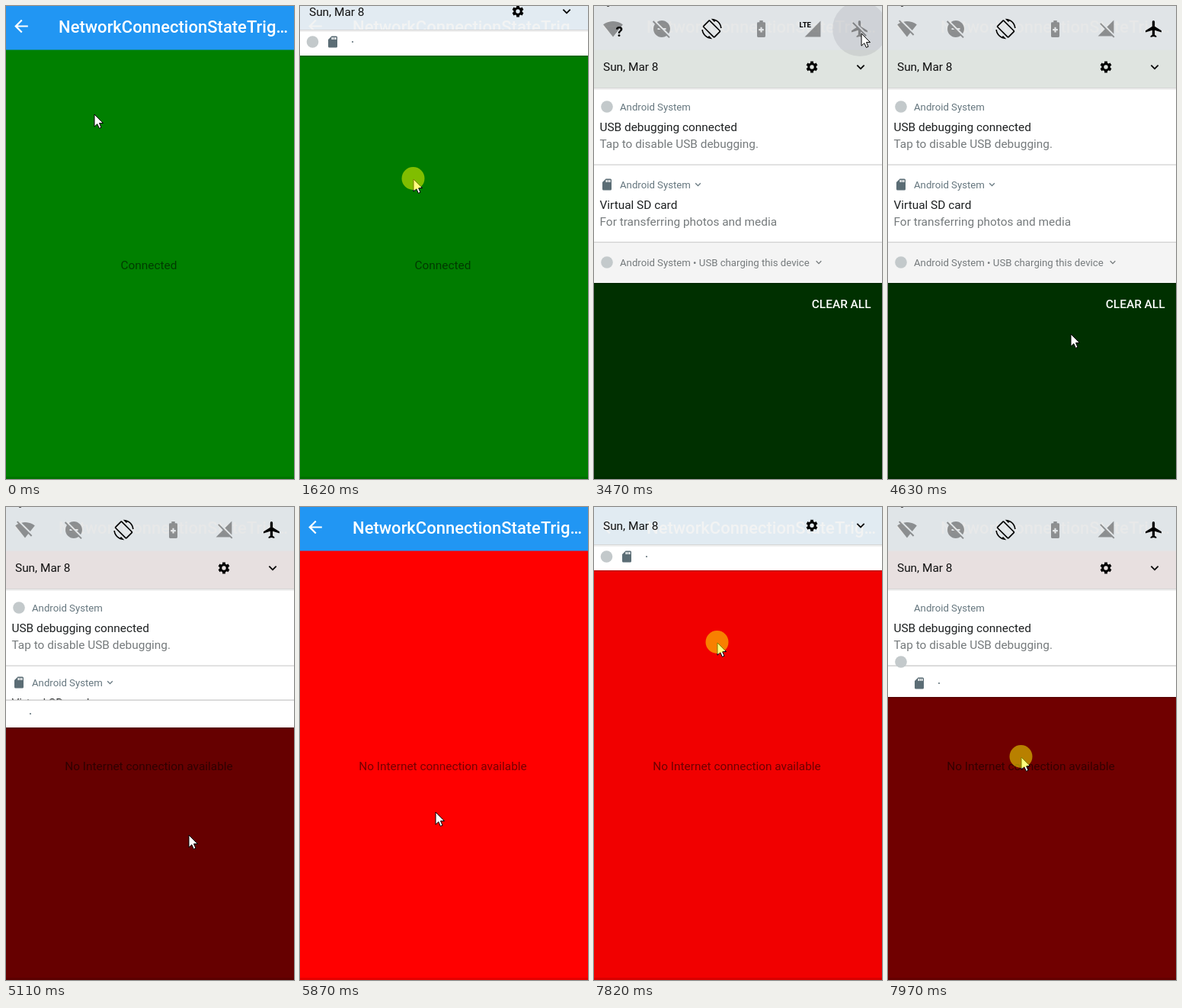
Write an HTML page with a canvas that moves like this. It is 378 px wide and 620 px high and loops after 8 s.

```html
<!DOCTYPE html>
<html lang="en">
<head>
<meta charset="utf-8">
<title>Network state trigger</title>
<style>
html, body { margin: 0; width: 100%; height: 100%; overflow: hidden; background: #008000; }
canvas { display: block; width: 378px; height: 620px; }
</style>
</head>
<body>
<canvas id="stage" width="378" height="620"></canvas>
<script>
const ctx = document.getElementById('stage').getContext('2d');
const W = 378, LOOP = 8000, STEP = 77.3;
const GREY = 'rgba(0,0,0,.38)', SLATE = '#66777f', DARK = '#1c1f20', SOFT = '#757a7c';

// Icons on a 24 unit grid
const ICONS = {
  back: 'M20 11H7.83l5.59-5.59L12 4l-8 8 8 8 1.41-1.41L7.83 13H20z',
  chevron: 'M16.59 8.59L12 13.17 7.41 8.59 6 10l6 6 6-6z',
  wifi: 'M12 21.5L23.64 7C23.2 6.66 18.7 3 12 3S.81 6.66.36 7z',
  wifiOff: 'M23.64 7c-.45-.34-4.93-4-11.64-4-1.5 0-2.89.19-4.15.48L18.18 13.8zM17.04 15.22L3.27 1.44 2 2.72l2.05 2.06C1.91 5.76.59 6.82.36 7L12 21.5l3.91-4.87 3.32 3.32 1.27-1.27z',
  quietOff: 'M17 11v2h-1.46l4.68 4.68A9.92 9.92 0 0 0 22 12c0-5.52-4.48-10-10-10-2.11 0-4.07.66-5.68 1.78L13.54 11zM2.27 2.27L1 3.54l2.78 2.78A9.92 9.92 0 0 0 2 12c0 5.52 4.48 10 10 10 2.11 0 4.07-.66 5.68-1.78L20.46 23l1.27-1.27zM7 13v-2h1.46l2 2z',
  rotate: 'M16.48 2.52c3.27 1.55 5.61 4.72 5.97 8.48h1.5C23.44 4.84 18.29 0 12 0l-.66.03 3.81 3.81zM10.23 1.75c-.59-.59-1.54-.59-2.12 0L1.75 8.11c-.59.59-.59 1.54 0 2.12l12.02 12.02c.59.59 1.54.59 2.12 0l6.36-6.36c.59-.59.59-1.54 0-2.12zM14.83 21.19L2.81 9.17l6.36-6.36 12.02 12.02zM7.52 21.48C4.25 19.94 1.91 16.76 1.55 13H.05C.56 19.16 5.71 24 12 24l.66-.03-3.81-3.81z',
  battery: 'M14 4V2h-4v2H8.3Q7 4 7 5.3V20.7Q7 22 8.3 22h7.4Q17 22 17 20.7V5.3Q17 4 15.7 4zM9 12h2v-2h2v2h2v2h-2v2h-2v-2H9z',
  signal: 'M2 22h20V2z',
  signalOff: 'M21 1l-8.59 8.59L21 18.18zM4.77 4.5L3.5 5.77l6.36 6.36L1 21h17.73l2 2L22 21.73z',
  plane: 'M21 16v-2l-8-5V3.5a1.5 1.5 0 0 0-3 0V9l-8 5v2l8-2.5V19l-2 1.5V22l3.5-1 3.5 1v-1.5L13 19v-5.5z',
  planeOff: 'M13 9V3.5a1.5 1.5 0 0 0-3 0v3.68l7.83 7.83L21 16v-2zM3 5.27l4.99 4.99L2 14v2l8-2.5V19l-2 1.5V22l3.5-1 3.5 1v-1.5L13 19v-3.73L18.73 21 20 19.73 4.27 4z',
  card: 'M18 2h-8L4 8v12q0 2 2 2h12q2 0 2-2V4q0-2-2-2zM10 4h2v4h-2zM13 4h2v4h-2zM16 4h2v4h-2z',
};
for (const name in ICONS) ICONS[name] = new Path2D(ICONS[name]);
const ARROW = new Path2D('M0 0V16.2L3.8 12.7 6.4 18.4 9 17.2 6.5 11.6H11.5z');

// Keys are [step, ...values]; the picture is refreshed once per step
const CURSOR = [
  [0, 116, 142], [7, 80, 50], [11, 100, 4], [18, 100, 4], [19, 112, 30], [21, 149, 227],
  [23, 153, 345], [25, 153, 401], [26, 153, 401], [35, 352, 60], [37, 340, 40], [39, 351, 36],
  [52, 351, 36], [57, 212, 330], [60, 240, 430], [75, 240, 430], [76, 178, 400],
  [78, 97, 352], [82, 298, 350], [83, 298, 350], [87, 124, 328], [88, 124, 328],
  [92, 108, 1], [99, 108, 1], [100, 130, 60], [101, 162, 178], [103, 175, 328],
];
const PANEL = [
  [0, 0], [18, 0], [19, 8], [20, 38], [21, 65], [22, 190], [23, 290], [24, 345], [25, 363],
  [63, 363], [64, 355], [65, 330], [66, 289], [67, 150], [68, 0],
  [99, 0], [100, 38], [101, 83], [102, 160], [103, 249],
];
const SCRIM = [[0, 0], [65, .03], [83, .055], [249, .56], [289, .6], [363, .625]];
const PRESSES = [[19, 25], [41, 43], [62, 64], [100, 104]];

function track(keys, at) {
  const next = keys.findIndex(key => key[0] > at);
  if (next < 0) return keys[keys.length - 1].slice(1);
  const a = keys[next - 1], b = keys[next];
  const p = (at - a[0]) / (b[0] - a[0]);
  return a.slice(1).map((v, i) => v + (b[i + 1] - v) * p);
}

function rect(x, y, w, h, color) {
  ctx.fillStyle = color;
  ctx.fillRect(x, y, w, h);
}

function disc(x, y, r, color) {
  ctx.fillStyle = color;
  ctx.beginPath();
  ctx.arc(x, y, r, 0, 2 * Math.PI);
  ctx.fill();
}

function text(str, x, y, color, size = 15.4, weight = 400, align = 'left') {
  ctx.font = `${weight} ${size}px Roboto, sans-serif`;
  ctx.textAlign = align;
  ctx.fillStyle = color;
  ctx.fillText(str, x, y);
}

function icon(name, cx, cy, size, color) {
  ctx.save();
  ctx.translate(cx - size / 2, cy - size / 2);
  ctx.scale(size / 24, size / 24);
  ctx.fillStyle = color;
  ctx.fill(ICONS[name], 'evenodd');
  ctx.restore();
}

function gear(x, y) {
  ctx.strokeStyle = '#000';
  ctx.lineWidth = 3;
  ctx.beginPath();
  ctx.arc(x, y, 4.2, 0, 2 * Math.PI);
  ctx.stroke();
  ctx.lineWidth = 3.8;
  ctx.beginPath();
  for (let i = 0; i < 6; i++) {
    const a = (i + .5) * Math.PI / 3, c = Math.cos(a), s = Math.sin(a);
    ctx.moveTo(x + 4 * c, y + 4 * s);
    ctx.lineTo(x + 7.5 * c, y + 7.5 * s);
  }
  ctx.stroke();
}

const badge = (x, y) => disc(x, y, 7.8, '#c3c9cb');
const card = (x, y) => icon('card', x, y, 18, '#5b6d75');
const dot = (x, y) => disc(x, y, 1.1, SLATE);

function page(online) {
  rect(0, 0, W, 620, online ? '#008000' : '#f00');
  rect(0, 617, W, 3, 'rgba(0,0,0,.1)');
  text(online ? 'Connected' : 'No Internet connection available',
    187.5, 345, 'rgba(0,0,0,.54)', 15.4, 400, 'center');
  rect(0, 0, W, 57.5, '#2196f3');
  icon('back', 20, 26.5, 26.4, '#fff');
  text('NetworkConnectionStateTrig…', 69, 35, '#fff', 22, 500);
}

function tiles(y, step) {
  const wifiLost = step >= 47, flight = step >= 48;
  if (step >= 45 && step < 50) disc(349, y, 36, `rgba(0,0,30,${.08 * (50 - step) / 5})`);
  icon(wifiLost ? 'wifiOff' : 'wifi', 25, y, 26.4, GREY);
  if (!wifiLost) {
    ctx.lineWidth = 4;
    ctx.strokeStyle = '#dfe5e9';
    ctx.strokeText('', 0, 0);
    text('?', 28.5, y + 10, '#000', 19, 700);
  }
  icon('quietOff', 89, y, 26.4, GREY);
  icon('rotate', 154.5, y, 26.4, '#000');
  icon('battery', 219.5, y, 26.4, GREY);
  icon(flight ? 'signalOff' : 'signal', 287, y, 25, GREY);
  if (!flight) {
    rect(269, y - 12, 16, 11, '#dfe5e9');
    text('LTE', 269.5, y - 2.5, '#000', 9.5, 700);
  }
  icon(flight ? 'plane' : 'planeOff', 349, y, 26.4, flight ? '#000' : GREY);
}

function header(height, step) {
  rect(0, 0, W, height, 'rgba(242,243,244,.92)');
  ctx.save();
  ctx.beginPath();
  ctx.rect(0, 0, W, height);
  ctx.clip();
  ctx.globalAlpha = Math.max(0, Math.min(1, (height - 60) / 40));
  tiles(height - 77, step);
  rect(17, 0, 3, 1, '#555');
  ctx.globalAlpha = 1;
  const y = height - 24 - (height - 31) * .04;
  text('Sun, Mar 8', 12, y + 5.5, '#111');
  gear(286, y);
  icon('chevron', 350, y, 21, '#000');
  ctx.restore();
}

function notice(y, title, detail) {
  text('Android System', 34, y + 5, SLATE, 13.2);
  text(title, 7.5, y + 32, DARK);
  text(detail, 7.5, y + 54, SOFT);
}

function notices(top, bottom) {
  const open = bottom >= 360;
  let shelf = bottom - 36;
  if (bottom < 260) shelf = Math.min(shelf, 208);
  shelf = open ? bottom : Math.max(top, shelf);

  rect(0, top, W, bottom - top, '#fff');
  ctx.save();
  ctx.beginPath();
  ctx.rect(0, top, W, shelf - top);
  ctx.clip();
  if (bottom >= 260) badge(17, 132);
  if (bottom >= 180) notice(132, 'USB debugging connected', 'Tap to disable USB debugging.');
  if (bottom >= 260) {
    const y = open ? 234 : 230;
    rect(0, 207.5, W, 1.2, '#cfcfcf');
    card(17, y);
    notice(y, 'Virtual SD card', 'For transferring photos and media');
    icon('chevron', 136.5, y, 15, SLATE);
  }
  if (open) {
    rect(0, 309, W, 54, '#f4f4f4');
    rect(0, 309, W, 1.2, '#cfcfcf');
    badge(17, 336);
    text('Android System • USB charging this device', 34, 341, SOFT, 13.2);
    icon('chevron', 295, 336, 15, SOFT);
  }
  ctx.restore();

  if (!open) {
    if (bottom >= 180) rect(0, shelf - .5, W, 1.2, '#c4c4c4');
    const y = bottom - 18;
    if (bottom < 180) {
      badge(16.5, y);
      card(43, y);
      dot(69, y);
    } else if (bottom < 260) {
      badge(17, shelf - 5);
      card(41, y);
      dot(67, y);
    } else {
      dot(32, y);
    }
  }
  rect(0, top, W, 1, 'rgba(0,0,0,.16)');
  rect(0, top + 1, W, 2, 'rgba(0,0,0,.06)');
  rect(0, bottom, W, 1.5, 'rgba(0,0,0,.22)');
}

function panel(bottom, step) {
  rect(0, 0, W, 620, `rgba(0,0,0,${track(SCRIM, bottom)[0]})`);
  const top = Math.max(0, Math.min(107, bottom - 34));
  header(top, step);
  notices(top, bottom);
  if (bottom >= 363) text('CLEAR ALL', 363.5, 396, '#fff', 15.4, 500, 'right');
}

function pointer(step) {
  const [x, y] = track(CURSOR, step);
  ctx.save();
  ctx.translate(x, y);
  ctx.fillStyle = '#fff';
  ctx.strokeStyle = '#000';
  ctx.lineWidth = 1;
  ctx.fill(ARROW);
  ctx.stroke(ARROW);
  ctx.restore();
  if (PRESSES.some(([from, to]) => step >= from && step < to)) {
    disc(x - .5, y - 1, 15, 'rgba(255,255,0,.5)');
  }
}

function draw(now) {
  const step = Math.floor((now % LOOP + 10) / STEP);
  const bottom = track(PANEL, step)[0];
  page(step < 64);
  if (bottom > 0) panel(bottom, step);
  pointer(step);
  requestAnimationFrame(draw);
}
requestAnimationFrame(draw);
</script>
</body>
</html>
```
